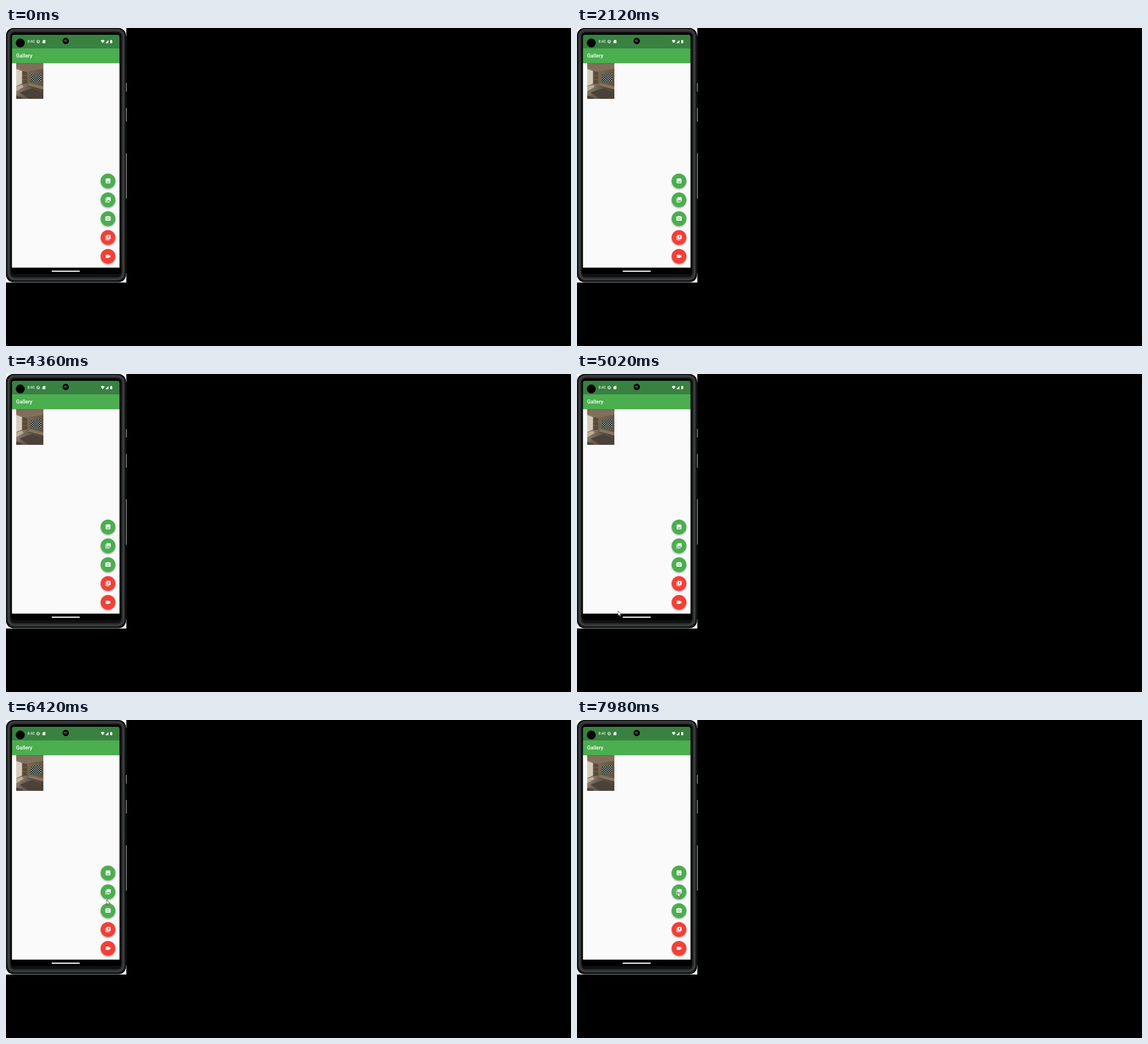
Animation, 998 px wide and 561 px high, one loop 8 s. Source, as an HTML page:

```html
<!DOCTYPE html>
<html lang="en">
<head>
<meta charset="utf-8">
<title>Gallery</title>
<style>
  html, body { margin: 0; width: 100%; height: 100%; overflow: hidden; background: #000; }
  svg { display: block; width: 998px; height: 561px; }
  text { font-family: Roboto, sans-serif; fill: #fff; }
</style>
</head>
<body>
<svg viewBox="0 0 998 561">
  <defs>
    <linearGradient id="wall" x2="1" y2=".4">
      <stop offset="0" stop-color="#93836f"/>
      <stop offset=".5" stop-color="#76664f"/>
      <stop offset="1" stop-color="#645443"/>
    </linearGradient>
    <linearGradient id="floor" x2="1" y2=".4">
      <stop offset="0" stop-color="#a89a89"/>
      <stop offset=".45" stop-color="#6b5d50"/>
      <stop offset="1" stop-color="#51453a"/>
    </linearGradient>
    <linearGradient id="barShadow" x2="0" y2="1">
      <stop offset="0" stop-color="#000" stop-opacity=".14"/>
      <stop offset="1" stop-color="#000" stop-opacity="0"/>
    </linearGradient>
    <pattern id="check" width="4" height="4" patternUnits="userSpaceOnUse">
      <path fill="#20282a" d="M0 0h4v4H0z"/>
      <path fill="#8b948c" d="M0 0h2v2H0zM2 2h2v2H2z"/>
    </pattern>
    <filter id="soft" x="-30%" y="-30%" width="160%" height="160%"><feGaussianBlur stdDeviation="1.5"/></filter>
    <filter id="smooth"><feGaussianBlur stdDeviation=".6"/></filter>
    <clipPath id="device"><path d="M0 0h213v449H0z"/></clipPath>
    <clipPath id="photo"><path d="M18 62h48v63H18z"/></clipPath>
    <clipPath id="pressed"><circle cx="180" cy="303.2" r="13"/></clipPath>
  </defs>

  <rect width="998" height="561"/>

  <!-- phone body -->
  <g clip-path="url(#device)">
    <rect width="212.5" height="449" fill="#fff"/>
    <rect width="212" height="448.5" rx="13" fill="#0f1011"/>
    <rect x="5" y="4.500" width="202" height="438" rx="10" fill="none" stroke="#2b2c2d" stroke-width="6"/>
    <rect x="4.500" y="3.500" width="203" height="440" rx="11" fill="none" stroke="#48494b" stroke-width="1.400"/>
    <rect x="8" y="8" width="196" height="426" rx="7"/>
    <path fill="#0f1011" d="M210.700 14h2.300v83h-2.300zM210.700 112h2.300v29h-2.300zM210.700 165h2.300v56h-2.300zM210.700 301h2.300v132h-2.300z"/>
    <path fill="#b9babb" d="M212 97h1v15h-1zM212 141h1v24h-1zM212 221h1v80h-1z"/>
  </g>

  <!-- screen -->
  <path fill="#fafafa" d="M10.500 62h190v360.700h-190z"/>
  <path fill="#388140" d="M10.500 36V16q0-4 4-4h182q4 0 4 4v20z"/>
  <path fill="#4bae4f" d="M10.500 36h190v26h-190z"/>
  <rect x="80.500" y="428" width="50" height="2" rx="1" fill="#fff"/>

  <!-- picture -->
  <g clip-path="url(#photo)">
    <path fill="url(#wall)" d="M18 62h48v63H18z"/>
    <g filter="url(#smooth)">
      <path fill="#806f5a" d="M17 61h50v11L38 76 17 70z"/>
      <path fill="#d5ccbd" d="M17 72l11 4v22l-11 5z"/>
      <path fill="#58493b" d="M29.500 76l8 2v20l-8 1z"/>
      <path stroke="#7b6b58" d="M30 84h7M30 91h7"/>
      <path fill="url(#floor)" d="M17 104l19-6 31 12v16H17z"/>
      <path fill="#85745f" d="M40 97l27 6v6l-27-7z"/>
      <path fill="#4c4036" d="M40 102l27 7v2l-27-8z"/>
      <path fill="#4a4139" d="M24 114l23-8 20 10v5l-24 5z"/>
      <path fill="#bbae9d" d="M17 104l11-4 3 4-14 8z"/>
      <path fill="#4c433a" d="M17 119l11 3 2 4H17z"/>
    </g>
    <path fill="url(#check)" d="M43.500 82L62 79v15.500l-18.500 2z"/>
    <path fill="#2b6a50" d="M43.500 91h4v5.200l-4 .3z" opacity=".6"/>
  </g>
  <path fill="url(#barShadow)" d="M10.500 62h190v2h-190z"/>

  <!-- status bar -->
  <circle cx="25.200" cy="26.400" r="7.800"/>
  <circle cx="105.500" cy="22.800" r="5.600"/>
  <circle cx="105.500" cy="22.800" r="3" fill="#292b2e"/>
  <circle cx="104.300" cy="22.300" r=".9" fill="#85898c"/>
  <circle cx="107.200" cy="23.200" r=".6" fill="#53575a"/>
  <text x="38" y="26.400" font-size="6.500">8:40</text>
  <g fill="none" stroke="#fff" stroke-width=".9">
    <circle cx="56.900" cy="24" r="2.500"/>
    <path d="M55.500 23.300h.8M57.500 23.300h.8M55.700 25h2.400"/>
  </g>
  <path fill="#fff" d="M66 21.300h3.500v5.400h-5v-3.800zM167.400 22.200q3.400-2.400 6.800 0l-3.400 4.500zM175.400 26.700l5.500-5.500v5.500zM184 21.800h1v-.7h1.600v.7h1v4.900H184z"/>
  <text x="17.700" y="52.200" font-size="9.280" font-weight="500">Gallery</text>

  <g id="buttons"></g>

  <circle id="splash" cx="177.500" cy="304" r="2" fill="#fff" opacity="0" clip-path="url(#pressed)"/>
  <g clip-path="url(#device)">
    <path id="cursor" d="M0 0v8.700l2-1.800 1.300 3 1.500-.7-1.300-2.900h2.700z"
      fill="#fff" stroke="#333" stroke-width=".75" opacity="0"/>
  </g>
</svg>

<script>
const LOOP = 8000;
const GREEN = '#4bae4f', RED = '#f43f36';
const icons = [
  [GREEN, 'M21 19V5c0-1.100-.9-2-2-2H5c-1.100 0-2 .9-2 2v14c0 1.100.9 2 2 2h14c1.100 0 2-.9 2-2zM8.500 13.500l2.500 3L14.500 12l4.500 6H5z'],
  [GREEN, 'M22 16V4c0-1.100-.9-2-2-2H8c-1.100 0-2 .9-2 2v12c0 1.100.9 2 2 2h12c1.100 0 2-.9 2-2zm-11-4l2 2.700L16 11l4 5H8zM2 6v14c0 1.100.9 2 2 2h14v-2H4V6z'],
  [GREEN, 'M9 2L7.200 4H4c-1.100 0-2 .9-2 2v12c0 1.100.9 2 2 2h16c1.100 0 2-.9 2-2V6c0-1.100-.9-2-2-2h-3.200L15 2zm3 5a5 5 0 1 1 0 10 5 5 0 0 1 0-10zm0 1.800a3.200 3.200 0 1 0 0 6.400 3.200 3.200 0 0 0 0-6.400z'],
  [RED, 'M4 6H2v14c0 1.100.9 2 2 2h14v-2H4zM20 2H8c-1.100 0-2 .9-2 2v12c0 1.100.9 2 2 2h12c1.100 0 2-.9 2-2V4c0-1.100-.9-2-2-2zm-8 12.500v-9l6 4.500z'],
  [RED, 'M17 10.500V7c0-.55-.45-1-1-1H4c-.55 0-1 .45-1 1v10c0 .55.45 1 1 1h12c.55 0 1-.45 1-1v-3.500l4 4v-11z']
];

document.getElementById('buttons').innerHTML = icons.map(([color, path], i) => `
  <g transform="translate(180.2 ${269.8 + i * 33.25})">
    <circle cy="1.700" r="12.800" opacity=".38" filter="url(#soft)"/>
    <circle r="13" fill="${color}"/>
    <path transform="scale(.464) translate(-12 -12)" fill="#fff" fill-rule="evenodd" d="${path}"/>
  </g>`).join('');

// time, x, y of the pointer tip
const pointer = [
  [4860, 62, 449],
  [5200, 84, 383],
  [5580, 96.8, 357],
  [5900, 125, 346],
  [6240, 168, 326],
  [6420, 177.8, 317],
  [6800, 177.8, 306],
  [7100, 177.5, 303.5],
  [LOOP, 177.5, 303.5]
];

const play = (id, frames) =>
  document.getElementById(id).animate(frames, { duration: LOOP, iterations: Infinity });

const move = (x, y) => `translate(${x}px, ${y}px)`;
const [start, startX, startY] = pointer[0];

play('cursor', [
  { offset: 0, transform: move(startX, startY), opacity: 0 },
  { offset: start / LOOP, transform: move(startX, startY), opacity: 0 },
  ...pointer.map(([t, x, y]) => ({ offset: t / LOOP, transform: move(x, y), opacity: 1 }))
]);

play('splash', [
  { offset: 0, r: '2px', opacity: 0 },
  { offset: 7840 / LOOP, r: '2px', opacity: 0 },
  { offset: 1, r: '9px', opacity: .1 }
]);
</script>
</body>
</html>
```
